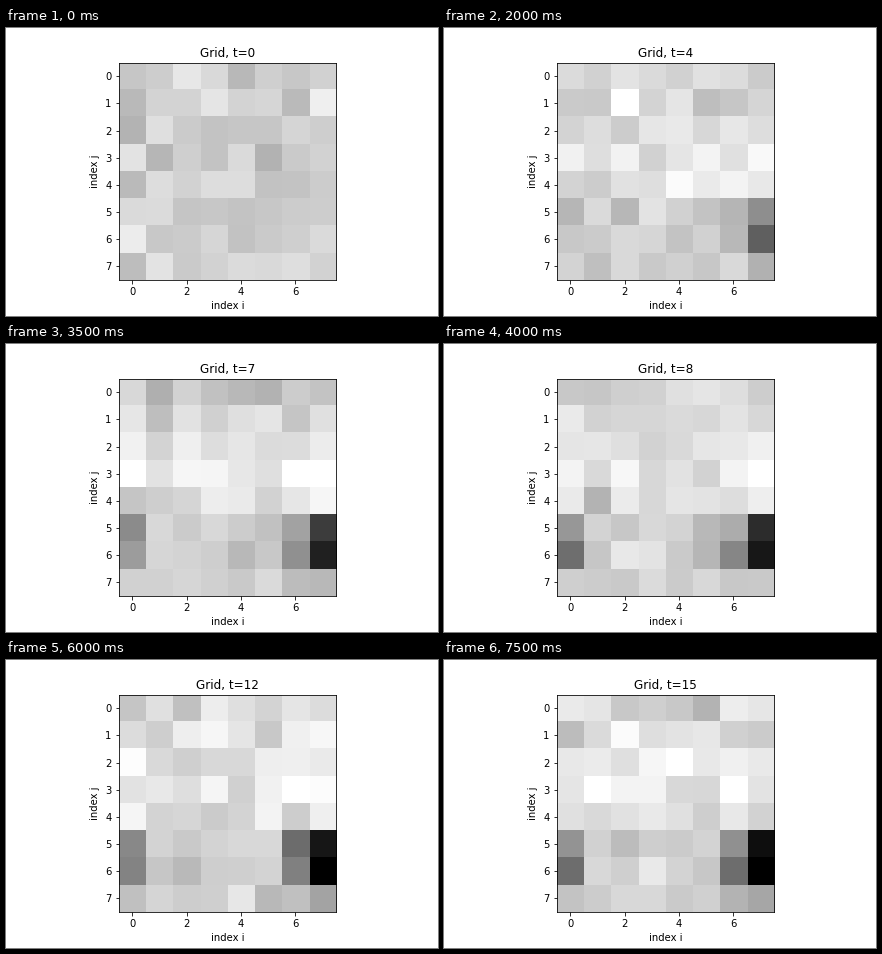
Write a matplotlib script that moves like this. It is 432 px wide and 288 px high and loops after 8000 ms.

```python
import numpy as np
import matplotlib.pyplot as plt
from matplotlib.animation import FuncAnimation

STEPS = 16
SIZE = 8
RAMP = 10  # steps until the trends are complete

rows, cols = np.mgrid[:SIZE, :SIZE]


def bump(row, col, width):
    """Gaussian spot that wraps round the edges of the grid."""
    dr = (rows - row + SIZE / 2) % SIZE - SIZE / 2
    dc = (cols - col + SIZE / 2) % SIZE - SIZE / 2
    return np.exp(-(dr**2 + dc**2) / (2 * width**2))


HOLE = 310 * bump(5.55, 7, 0.7)
GLOW = 42 * bump(3.6, 7, 0.9)
BAND = 24 * np.exp(-((rows - 2.5) / 2) ** 2)


def trend(t):
    """A hole deepens, a glow appears early, the upper rows brighten."""
    ramp = min(t / RAMP, 1)
    early = min(t / 2, 1)
    return 207 + BAND * ramp + GLOW * early - HOLE * ramp**1.1


def simulate(seed=4, memory=0.4, spread=14):
    """Correlated noise around the trend."""
    rng = np.random.default_rng(seed)
    noise = rng.normal(0, spread, (SIZE, SIZE))
    grids = []
    for t in range(STEPS):
        grids.append(np.clip(trend(t) + noise, 0, 255))
        kick = rng.normal(0, spread, (SIZE, SIZE))
        noise = memory * noise + np.sqrt(1 - memory**2) * kick
    return grids


grids = simulate()

plt.rcParams["font.family"] = "DejaVu Sans"
fig, ax = plt.subplots(figsize=(6, 4), dpi=72, facecolor="white")
fig.subplots_adjust(left=0.125, right=0.9, bottom=0.125, top=0.88)
image = ax.imshow(grids[0], cmap="gray", vmin=0, vmax=255,
                  interpolation="nearest")
ax.set_xticks(range(0, SIZE, 2))
ax.set_yticks(range(SIZE))
ax.set_xlabel("index i")
ax.set_ylabel("index j", labelpad=5)
title = ax.set_title("Grid, t=0")


def update(t):
    image.set_data(grids[t])
    title.set_text(f"Grid, t={t}")
    return image, title


anim = FuncAnimation(fig, update, frames=STEPS, interval=500,
                     repeat=True, repeat_delay=0, blit=False)
plt.show()
```
